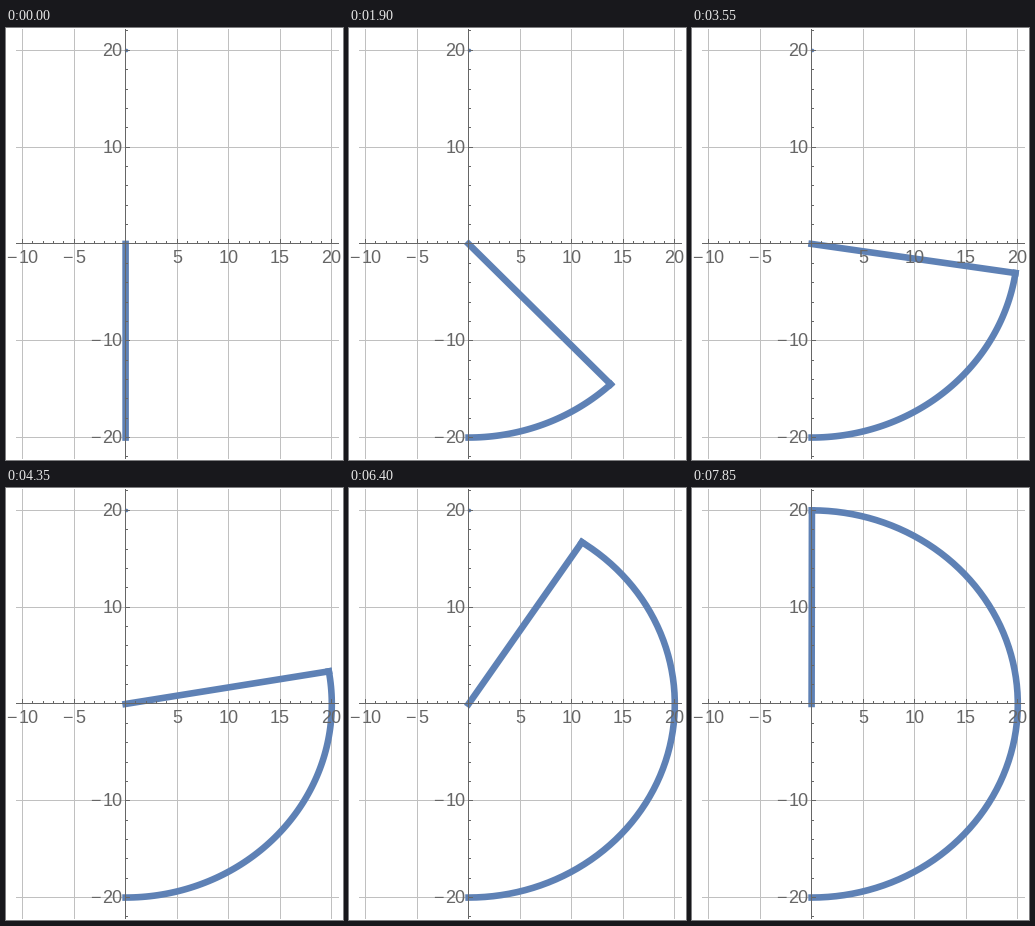
A matplotlib script for the animation above (7.9 s loop, 337x432 px).

```python
import matplotlib.pyplot as plt
import numpy as np
from matplotlib.animation import FuncAnimation

W, H, DPI = 337, 432, 100
PX = 72 / DPI                      # points per pixel
BLUE, GRAY, GRID = "#5e81b5", "#666666", "#c0c0c0"
FRAMES, STEP, RADIUS = 158, 0.02, 20
LEFT, RIGHT, TOP, BOTTOM = 10, 333, 1, 431
FONT = 18                          # label size in pixels
DIGIT, MINUS, GAP = 0.556 * FONT, 0.584 * FONT, 2

# snapping would push half-pixel positions one pixel further
plt.rcParams["path.snap"] = False

fig = plt.figure(figsize=(W / DPI, H / DPI), dpi=DPI, facecolor="white")
ax = fig.add_axes([0, 0, 1, 1])
ax.set(xlim=(0, W), ylim=(H, 0))
ax.axis("off")


def sx(x):
    return 119.6 + 10.31 * x


def sy(y):
    return 215.95 - 9.68 * y


def mid(v):
    """Center of the pixel that holds v."""
    return np.floor(v) + 0.5


def rule(x0, y0, x1, y1, color, z):
    ax.plot([x0, x1], [y0, y1], color=color, lw=PX, zorder=z,
            solid_capstyle="butt")


def stroke():
    return ax.plot([], [], color=BLUE, lw=6.6 * PX, zorder=3,
                   solid_capstyle="projecting")[0]


def label(n, right, base):
    style = dict(family="Liberation Sans", fontsize=FONT * PX, color=GRAY,
                 ha="right", va="baseline", zorder=5)
    digits = str(abs(n))
    ax.text(right, base, digits, **style)
    if n < 0:
        ax.text(right - DIGIT * len(digits) - GAP, base, "\u2212", **style)


def label_width(n):
    return DIGIT * len(str(abs(n))) + (MINUS + GAP if n < 0 else 0)


# grid
for x in range(-10, 21, 5):
    rule(mid(sx(x)), TOP, mid(sx(x)), BOTTOM, GRID, 1)
for y in range(-20, 21, 10):
    rule(LEFT, mid(sy(y)), RIGHT, mid(sy(y)), GRID, 1)

# axes, ticks and labels lie above the curve
x0, y0 = mid(sx(0)), mid(sy(0))
rule(LEFT, y0, RIGHT, y0, GRAY, 4)
rule(x0, TOP, x0, BOTTOM, GRAY, 4)
for x in range(-10, 21):
    rule(mid(sx(x)), y0, mid(sx(x)), y0 - (4.5 if x % 5 == 0 else 2.5), GRAY, 4)
    if x % 5 == 0 and x:
        label(x, sx(x) + label_width(x) / 2 - 0.3, 235)
for y in range(-22, 23, 2):
    rule(x0, mid(sy(y)), x0 + (4.5 if y % 10 == 0 else 2.5), mid(sy(y)), GRAY, 4)
    if y % 10 == 0 and y:
        label(y, 116.6, mid(sy(y)) + 5.5)

ax.plot(sx(0), sy(RADIUS), "o", ms=3.6 * PX, mew=0, color=BLUE, zorder=3)
arc, arm = stroke(), stroke()


def draw(i):
    t = np.linspace(0, i * STEP, 2 + i)
    x, y = sx(RADIUS * np.sin(t)), sy(-RADIUS * np.cos(t))
    arm.set_data([sx(0), x[-1]], [sy(0), y[-1]])
    arc.set_data(x, y) if i else arc.set_data([], [])
    return arc, arm


anim = FuncAnimation(fig, draw, frames=FRAMES, interval=50, repeat=True,
                     repeat_delay=0, blit=False)
plt.show()
```
